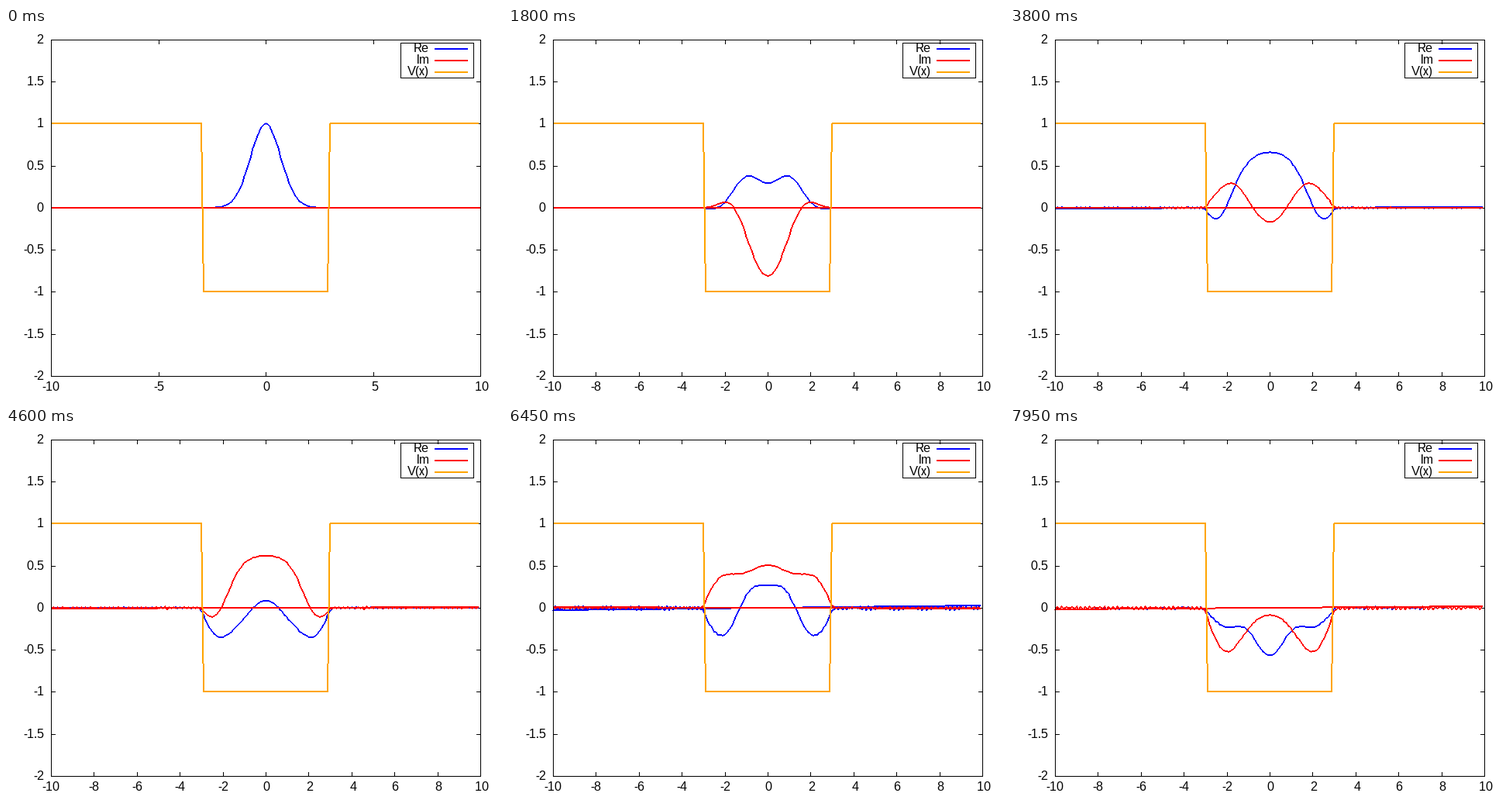
Recreate the animation shown at these times as a matplotlib script. Size 640 by 480 pixels, loop 8000 ms.

```python
import numpy as np
import matplotlib.pyplot as plt
from matplotlib.animation import FuncAnimation

W, H, DPI = 640, 480, 80
PX = 72 / DPI                       # one pixel in points
LEFT, RIGHT, TOP, BOTTOM = 58, 612, 15, 449
FRAMES, INTERVAL = 160, 50
BLACK, BLUE, RED, ORANGE = (0, 0, 0), (0, 0, 255), (255, 0, 0), (255, 165, 0)

# Split-step evolution of a Gaussian packet in a square well
N, DX, DT, DEPTH = 200, 0.1, 0.0125, 40
grid = np.arange(-N // 2, N // 2)
x = grid * DX
well = np.where(np.abs(grid) < 30, -1, 1)
k = 2 * np.pi * np.fft.fftfreq(N) * N / (x[-1] - x[0])
half_v = np.exp(-0.5j * DT * DEPTH * well)
kinetic = np.exp(-0.5j * DT * k ** 2)


def evolve():
    psi = np.exp(-x ** 2).astype(complex)
    states = [psi]
    for _ in range(FRAMES - 1):
        psi = half_v * np.fft.ifft(kinetic * np.fft.fft(half_v * psi))
        states.append(psi)
    return states


states = evolve()


def half_up(d):
    """Round to whole pixels, halves away from zero."""
    return (np.sign(d) * np.floor(np.abs(d) + 0.5 + 1e-9)).astype(int)


def to_px(u):
    return LEFT + half_up((np.asarray(u) + 10) * (RIGHT - LEFT) / 20)


def to_py(v):
    return BOTTOM - half_up((np.asarray(v) + 2) * (BOTTOM - TOP) / 4)


def stroke(img, xs, ys, color, width=1):
    """Draw a hard-edged polyline, thickened across its main direction."""
    xs, ys = np.asarray(xs), np.asarray(ys)
    dx, dy = np.diff(xs), np.diff(ys)
    n = np.maximum(np.abs(dx), np.abs(dy))
    seg = np.repeat(np.arange(len(n)), n + 1)
    step = np.arange(len(seg)) - (np.cumsum(n + 1) - n - 1)[seg]
    t = step / np.maximum(n, 1)[seg]
    cols = xs[seg] + half_up(dx[seg] * t)
    rows = ys[seg] + half_up(dy[seg] * t)
    steep = (np.abs(dy) > np.abs(dx))[seg]
    for i in range(width):
        img[rows - np.where(steep, 0, i), cols - np.where(steep, i, 0)] = color


def box(img, x0, y0, x1, y1):
    stroke(img, [x0, x1, x1, x0, x0], [y0, y0, y1, y1, y0], BLACK)


plt.rcParams["font.family"] = "Liberation Sans"
plt.rcParams["text.hinting"] = "native"
plt.rcParams["text.hinting_factor"] = 1
fig = plt.figure(figsize=(W / DPI, H / DPI), dpi=DPI, facecolor="white")
ax = fig.add_axes([0, 0, 1, 1])
ax.axis("off")


def label(px, py, text, ha):
    return ax.text(px, py, text, ha=ha, va="baseline", fontsize=16 * PX)


def number(v):
    return f"{v: g}"                # blank sign column for positives


def backdrop(x_ticks):
    img = np.full((H, W, 3), 255, np.uint8)
    for px in to_px(x_ticks):
        stroke(img, [px, px], [TOP, TOP + 5], BLACK)
        stroke(img, [px, px], [BOTTOM - 5, BOTTOM], BLACK)
    for py in to_py(y_ticks):
        stroke(img, [LEFT, LEFT + 5], [py, py], BLACK)
        stroke(img, [RIGHT - 5, RIGHT], [py, py], BLACK)
    box(img, 509, 19, 603, 64)
    for i, color in enumerate((BLUE, RED, ORANGE)):
        stroke(img, [553, 595], [27 + 15 * i] * 2, color, 2)
    return img


y_ticks = np.arange(-2, 2.1, 0.5)
coarse_ticks, fine_ticks = np.arange(-10, 11, 5), np.arange(-10, 11, 2)
coarse, fine = backdrop(coarse_ticks), backdrop(fine_ticks)

picture = ax.imshow(coarse, extent=(0, W, H, 0), interpolation="nearest",
                    aspect="auto")
ax.set_xlim(0, W)
ax.set_ylim(H, 0)

for v in y_ticks:
    label(49, to_py(v) + 5, number(v), "right")
for i, name in enumerate(("Re", "Im", "V(x)")):
    label(546, 31 + 15 * i, name, "right")
coarse_labels = [label(to_px(v), 468, number(v), "center") for v in coarse_ticks]
fine_labels = [label(to_px(v), 468, number(v), "center") for v in fine_ticks]


def draw(frame):
    first = frame == 0
    psi = states[frame]
    # the first curve spans the axis, later ones run back to their start
    xs = np.append(x, 10 if first else x[0])
    ys = np.append(psi, psi[0])
    img = (coarse if first else fine).copy()
    stroke(img, to_px(xs), to_py(ys.real), BLUE, 2)
    stroke(img, to_px(xs), to_py(ys.imag), RED, 2)
    stroke(img, to_px(x), to_py(well), ORANGE, 2)
    box(img, LEFT, TOP, RIGHT, BOTTOM)
    picture.set_data(img)
    for text in coarse_labels:
        text.set_visible(first)
    for text in fine_labels:
        text.set_visible(not first)
    return [picture]


anim = FuncAnimation(fig, draw, frames=FRAMES, interval=INTERVAL,
                     repeat=True, repeat_delay=0, blit=False)
plt.show()
```
